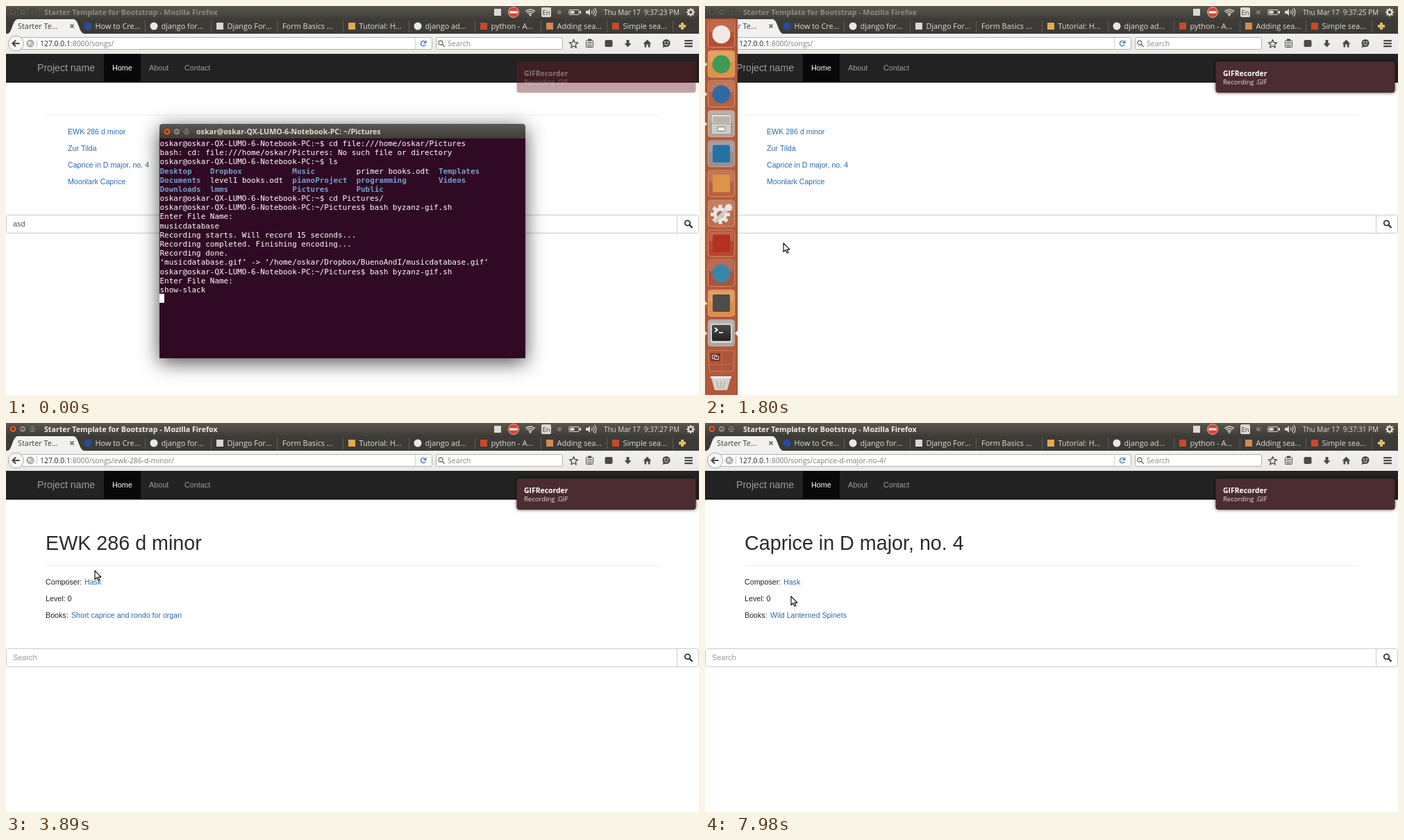
These frames come from a looping animation (998x561 px, 8000 ms). An HTML page with a canvas:

```html
<!DOCTYPE html>
<html lang="en">
<head>
<meta charset="utf-8">
<title>Song browser</title>
<style>
html, body { margin: 0; width: 100%; height: 100%; overflow: hidden; background: #fff; }
canvas { display: block; }
</style>
</head>
<body>
<canvas id="stage" width="998" height="561"></canvas>
<script>
const ctx = document.getElementById('stage').getContext('2d');
const LOOP = 8000;
const UI = '"Open Sans", "Noto Sans", sans-serif';
const WEB = '"Liberation Sans", Arial, sans-serif';
const MONO = '"DejaVu Sans Mono", monospace';
const LINK = '#2a69b0';

// Drawing helpers
function text(str, x, y, size, color, family = UI, weight = 400) {
  ctx.font = `${weight} ${size}px ${family}`;
  ctx.fillStyle = color;
  ctx.fillText(str, x, y);
}
function box(x, y, w, h, fill, r = 0, stroke) {
  ctx.beginPath();
  ctx.roundRect(x, y, w, h, r);
  if (fill) { ctx.fillStyle = fill; ctx.fill(); }
  if (stroke) { ctx.strokeStyle = stroke; ctx.lineWidth = 1; ctx.stroke(); }
}
function dot(x, y, r, fill, stroke, width = 1) {
  ctx.beginPath();
  ctx.arc(x, y, r, 0, Math.PI * 2);
  if (fill) { ctx.fillStyle = fill; ctx.fill(); }
  if (stroke) { ctx.strokeStyle = stroke; ctx.lineWidth = width; ctx.stroke(); }
}
function arc(x, y, r, from, to, color, width = 1.3) {
  ctx.beginPath();
  ctx.arc(x, y, r, from, to);
  ctx.strokeStyle = color;
  ctx.lineWidth = width;
  ctx.stroke();
}
function shape(d, x, y, fill, stroke, width = 1) {
  const p = new Path2D(d);
  ctx.save();
  ctx.translate(x, y);
  if (fill) { ctx.fillStyle = fill; ctx.fill(p); }
  if (stroke) { ctx.strokeStyle = stroke; ctx.lineWidth = width; ctx.stroke(p); }
  ctx.restore();
}
function fade(y0, y1, a, b) {
  const g = ctx.createLinearGradient(0, y0, 0, y1);
  g.addColorStop(0, a);
  g.addColorStop(1, b);
  return g;
}
function ramp(t, from, to) {
  const k = Math.min(1, Math.max(0, (t - from) / (to - from)));
  return k * k * (3 - 2 * k);
}
function lens(x, y, r, color, width) {
  dot(x, y, r, null, color, width);
  shape(`M${r * .7} ${r * .7}L${r * 1.9} ${r * 1.9}`, x, y, null, color, width * 1.25);
}
function gear(x, y, r, color, hole) {
  for (let i = 0; i < 8; i++) {
    const a = i * Math.PI / 4;
    shape(`M0 0L${Math.cos(a) * r} ${Math.sin(a) * r}`, x, y, null, color, r * .38);
  }
  dot(x, y, r * .72, color);
  dot(x, y, r * .36, hole);
}

// Pages of the site
const HOST = '127.0.0.1:8000';
const SONG_A = { name: 'EWK 286 d minor', url: '/songs/ewk-286-d-minor/' };
const SONG_B = { name: 'Caprice in D major, no. 4', url: '/songs/caprice-d-major-no-4/' };
const COMPOSER = { name: 'Hask', url: '/composers/hask/' };

const songPage = (song, book) => ({
  url: song.url, title: song.name, rule: 205, search: 325, value: 'Search',
  labels: [['Composer:', 57, 233], ['Level: 0', 57, 257], ['Books:', 57, 281]],
  links: [[COMPOSER.name, 113, 233], [book, 94, 281]]
});
const pages = [
  { from: 0, url: '/songs/', rule: 157, search: 301, value: 'asd', labels: [],
    links: [SONG_A.name, 'Zur Tilda', SONG_B.name, 'Moonlark Caprice'].map((s, i) => [s, 89, 185 + i * 24]) },
  { from: 3220, ...songPage(SONG_A, 'Short caprice and rondo for organ') },
  { from: 5330, url: COMPOSER.url, title: COMPOSER.name, search: 260, value: 'Search', bullets: true, labels: [],
    links: [[SONG_B.name, 57, 208], [SONG_A.name, 57, 224]] },
  { from: 7400, ...songPage(SONG_B, 'Wild Lanterned Spinets') }
];
const statusShows = [[2600, 3220, SONG_A.url], [4220, 5330, COMPOSER.url], [6640, 7400, SONG_B.url]];

// Pointer: time, x, y
const track = [
  [710, 0, 562], [1190, 0, 442], [1400, 14, 466], [1540, 14, 466], [1800, 113, 342],
  [2320, 123, 153], [2370, 123, 153], [2650, 127, 181], [3220, 127, 181], [3890, 128, 213],
  [3970, 126, 228], [6390, 126, 228], [6700, 130, 204], [7190, 130, 204], [7200, 130, 205],
  [7450, 130, 205], [7970, 124, 250]
];
function pointer(t) {
  if (t < track[0][0]) return null;
  for (let i = 1; i < track.length; i++) {
    const [t0, x0, y0] = track[i - 1], [t1, x1, y1] = track[i];
    if (t < t1) {
      const k = ramp(t, t0, t1);
      return { x: x0 + (x1 - x0) * k, y: y0 + (y1 - y0) * k };
    }
  }
  const [, x, y] = track.at(-1);
  return { x, y };
}

// Desktop panel
const ticks = [710, 1470, 2470, 3470, 4470, 5470, 6470, 7470];

function windowButtons(x, y, focused) {
  for (let i = 0; i < 3; i++) {
    const hot = focused && !i;
    const cx = x + i * 14;
    dot(cx, y, 5.2, hot ? '#e2592d' : focused ? '#83807a' : '#57554e', focused ? '#33322e' : '#3b3a35');
    const mark = ['M-2 -2L2 2M2 -2L-2 2', 'M-2.5 0H2.5', 'M-2.5 -2H2.5V2H-2.5Z'][i];
    shape(mark, cx, y, null, '#35342f', 1.1);
  }
}
function panel(t) {
  const focused = t > 1850;
  const ink = '#dfdbd2';
  box(0, 0, 998, 18, fade(0, 18, '#59574f', '#3f3e39'));
  windowButtons(10, 8.5, focused);
  text('Starter Template for Bootstrap - Mozilla Firefox', 55, 12.5, 10.65, focused ? '#f2efe8' : '#8d8a81', UI, 700);
  box(703, 4, 10, 10, '#dcdad5');
  dot(731, 9, 7.5, '#d9432f', '#e9b3a8');
  box(725.5, 7.5, 11, 3, '#fff');
  for (const r of [3, 6, 9]) arc(755, 14, r, -2.4, -.74, ink, 1.6);
  dot(755, 13.5, 1.3, ink);
  box(771, 2, 14, 14, ink, 2);
  text('En', 772.5, 12.5, 9.5, '#3c3b37');
  dot(797, 9, 3, '#77746c');
  box(811, 5.5, 14, 7, null, 1, ink);
  box(812.5, 7, 6, 4, ink);
  box(826, 7, 2, 4, ink);
  shape('M0 -2H3L6 -5V5L3 2H0Z', 835, 9, ink);
  for (const r of [3, 6, 9]) arc(841, 9, r, -.75, .75, ink, 1.1);
  const sec = 23 + ticks.filter(k => t >= k).length;
  text(`Thu Mar 17  9:37:${sec} PM`, 861, 12.5, 9.93, ink);
  gear(986, 9, 6, ink, '#4b4942');
}

// Browser frame
const tabs = [
  ['How to Cre...', '#2a4b9b', 1], ['django for...', '#e8e8e8', 1], ['Django For...', '#d8d8d8', 0],
  ['Form Basics ...', null], ['Tutorial: H...', '#e3a950', 0], ['django ad...', '#e8e8e8', 1],
  ['python - A...', '#c8492d', 0], ['Adding sea...', '#d08a52', 0], ['Simple sea...', '#c8492d', 0]
];
function browser(url) {
  const ink = '#4a4a48';
  box(0, 18, 998, 22, '#3c3b37');
  tabs.forEach(([label, color, round], i) => {
    const x = 118 + i * 95;
    if (color && round) dot(x, 29, 5.5, color);
    else if (color) box(x - 5, 24, 10, 10, color);
    text(label, color ? x + 10.5 : x - 5, 33, 10.9, '#e2dfd7');
    box(x + 82, 21, 1, 17, '#5f5d56');
  });
  shape('M-2 -5H2V-2H5V2H2V5H-2V2H-5V-2H-2Z', 974, 29, '#d9bf62');
  shape('M0 40C7 40 7 19 15 19H95C103 19 103 40 111 40Z', 2, 0, '#f2f1f0');
  text('Starter Te...', 17, 33, 10.9, '#3c3c3c');
  shape('M-2.5 -2.5L2.5 2.5M2.5 -2.5L-2.5 2.5', 95, 29, null, '#5c5b57', 1.6);

  box(0, 40, 998, 29, fade(40, 69, '#f2f1f0', '#eae8e5'));
  box(20, 45.5, 593.5, 17, '#fff', 2, '#b4b1ab');
  box(619.5, 45.5, 182, 17, '#fff', 2, '#b4b1ab');
  dot(14.5, 54, 11, '#f8f7f6', '#aaa7a1');
  shape('M5 0H-5M-.5 -4.5L-5 0L-.5 4.5', 14.5, 54, null, ink, 2.2);
  dot(35, 54, 5, '#b9b9b9', '#8d8d8d');
  shape('M-3 -2L0 -3L1 0L-2 2ZM2 1L4 0L2 4Z', 35, 54, '#eee');
  box(44, 48, 1, 12, '#c4c2be');
  text(HOST.slice(0, 9), 49, 58, 10.4, '#222');
  const w = ctx.measureText(HOST.slice(0, 9)).width;
  text(HOST.slice(9) + url, 49 + w, 58, 10.4, '#7d7d7d');
  box(589, 46, 1, 16, '#d4d2ce');
  arc(601, 54, 3.6, .5, 5.3, '#5b7fb5', 1.5);
  shape('M0 -5V0H-5Z', 605.5, 54, '#5b7fb5');
  lens(626, 53, 3, '#777', 1.3);
  text('Search', 636, 58, 10.6, '#8a8a8a');

  shape('M0 -6L1.7 -2L6 -1.6L2.7 1.2L3.7 5.5L0 3.2L-3.7 5.5L-2.7 1.2L-6 -1.6L-1.7 -2Z', 817.5, 54.5, null, ink, 1.3);
  box(835.5, 49.5, 10, 10, null, 1, ink);
  box(838, 47.5, 5, 3, ink);
  for (const y of [52, 54.5, 57]) box(837, y, 7, 1, ink);
  box(862.5, 49, 11, 10, ink, 2);
  shape('M-2 -5H2V0H5L0 5.5L-5 0H-2Z', 895.5, 54, ink);
  shape('M0 -5.5L6 .5H4V5.5H1.3V1.5H-1.3V5.5H-4V.5H-6Z', 923.5, 54, ink);
  dot(951, 53.5, 5.5, ink);
  shape('M-4 2L-5.5 6.5L0 5Z', 951, 53.5, ink);
  for (const x of [949, 953]) dot(x, 52, .9, '#fff');
  arc(951, 53.5, 2.6, .3, 2.84, '#fff', 1);
  for (const y of [49, 53, 57]) box(977, y, 12, 2.2, ink, 1);
}

// Site content
function site(page, mouse, t) {
  box(0, 69, 998, 492, '#fff');
  box(0, 69, 998, 41, '#222');
  box(0, 109, 998, 1.5, '#080808');
  box(141, 69, 53, 41, '#080808');
  text('Project name', 45, 94, 14.1, '#9d9d9d', WEB);
  text('Home', 153, 93, 10.8, '#fff', WEB);
  text('About', 206, 93, 10.8, '#9d9d9d', WEB);
  text('Contact', 257, 93, 10.8, '#9d9d9d', WEB);

  if (page.title) text(page.title, 57, 183, 28.7, '#2b2b2b', WEB);
  if (page.rule) box(57, page.rule, 884, 1, '#eee');
  for (const [s, x, y] of page.labels) text(s, x, y, 10.7, '#222', WEB);

  let over = false;
  for (const [s, x, y] of page.links) {
    ctx.font = `10.65px ${WEB}`;
    const w = ctx.measureText(s).width;
    const hit = mouse && mouse.x >= x && mouse.x <= x + w && mouse.y >= y - 8 && mouse.y <= y + 3;
    text(s, x, y, 10.65, hit ? '#23527c' : LINK, WEB);
    if (hit) { box(x, y + 1, w, 1, '#23527c'); over = true; }
    if (page.bullets) dot(48.5, y - 3.5, 2.2, '#333');
    if (s === COMPOSER.name && t >= 5130 && t < 5330) {
      ctx.setLineDash([1, 1]);
      box(x + .5, y - 9.5, w - 1, 12, null, 0, '#555');
      ctx.setLineDash([]);
    }
  }

  const y = page.search;
  box(.5, y + .5, 997, 26, '#fff', 3, '#ccc');
  box(966, y + 1, 1, 25, '#ccc');
  text(page.value, 10, y + 17, 10.9, page.value === 'asd' ? '#555' : '#999', WEB);
  lens(981.5, y + 12, 3.7, '#333', 1.8);
  return over;
}
function status(t) {
  for (const [from, to, url] of statusShows) {
    if (t < from || t >= to) continue;
    ctx.globalAlpha = Math.min(1, .4 + (t - from) / 180);
    const s = HOST + url.replace(/\/$/, '');
    ctx.font = `10.2px ${UI}`;
    const w = ctx.measureText(s).width + 10;
    box(-.5, 545.5, w, 17, '#f2f1f0', [0, 3, 0, 0], '#b6b4af');
    text(s, 3, 557, 10.2, '#3c3c3c');
    ctx.globalAlpha = 1;
  }
}

// Terminal window; a * marks a folder
const CELL = 6.58, ROW = 13.18;
const home = 'oskar@oskar-QX-LUMO-6-Notebook-PC:~';
const listing = [
  ['*Desktop', '*Dropbox', '*Music', 'primer books.odt', '*Templates'],
  ['*Documents', 'level1 books.odt', '*pianoProject', '*programming', '*Videos'],
  ['*Downloads', '*lmms', '*Pictures', '*Public']
];
const output = [
  home + '$ cd file:///home/oskar/Pictures',
  'bash: cd: file:///home/oskar/Pictures: No such file or directory',
  home + '$ ls',
  ...listing,
  home + '$ cd Pictures/',
  home + '/Pictures$ bash byzanz-gif.sh',
  'Enter File Name:',
  'musicdatabase',
  'Recording starts. Will record 15 seconds...',
  'Recording completed. Finishing encoding...',
  'Recording done.',
  '‘musicdatabase.gif’ -> ‘/home/oskar/Dropbox/BuenoAndI/musicdatabase.gif’',
  home + '/Pictures$ bash byzanz-gif.sh',
  'Enter File Name:',
  'show-slack',
  'Recording starts. Will record 15 seconds...'
];
const columns = [0, 11, 29, 43, 61];

function terminal(t) {
  const k = ramp(t, 1520, 1720);
  if (k >= 1) return;
  ctx.save();
  ctx.globalAlpha = 1 - k;
  ctx.translate(24 * k, 472 * k);
  ctx.scale(1 - k * .9, 1 - k * .9);
  ctx.shadowColor = 'rgba(0,0,0,.7)';
  ctx.shadowBlur = 28;
  ctx.shadowOffsetY = 6;
  box(221, 170, 527, 338, '#300a24', [5, 5, 0, 0]);
  ctx.shadowColor = 'transparent';
  box(221, 170, 527, 21, fade(170, 191, '#5b5951', '#3d3c37'), [5, 5, 0, 0]);
  windowButtons(232, 181, true);
  text('oskar@oskar-QX-LUMO-6-Notebook-PC: ~/Pictures', 274, 185, 10.65, '#dfdbd2', UI, 700);
  const rows = t < 100 ? 17 : 18;
  output.slice(0, rows).forEach((row, i) => {
    const y = 202 + i * ROW;
    if (typeof row === 'string') return text(row, 221.5, y, 10.93, '#fff', MONO);
    row.forEach((name, c) => {
      const dir = name[0] === '*';
      text(dir ? name.slice(1) : name, 221.5 + columns[c] * CELL, y, 10.93, dir ? '#729fcf' : '#fff', MONO, dir ? 700 : 400);
    });
  });
  if (t < 400 || t >= 1000) box(221, Math.round(191 + rows * ROW), 7, 13, '#fff');
  ctx.restore();
}

// Launcher: tile colour, then a plain mark or a drawing
const apps = [
  ['#b4502f', '#f3e9e4', 1], ['#dc9346', '#3f9a55', 1], ['#b9613f', '#2f6aa8', 1], ['#b9a396', cabinet],
  ['#9a8f90', '#2272a8', 0], ['#b9613d', '#dd9448', 0], ['#bb6a4a', wrench], ['#b4492f', '#b5301f', 0],
  ['#ab5439', '#3a86a8', 1], ['#dd8f47', '#4c4c4c', 0], ['#a9a7a3', prompt]
];
function cabinet(y) {
  box(9, y - 14, 29, 29, '#e3e1dd', 3, '#8d8a85');
  box(11, y - 11, 25, 9, '#b8b5ae', 1);
  box(9, y - 1, 29, 16, '#cfccc6', 2, '#8d8a85');
  box(18, y + 4, 11, 6, '#f4f3f1', 1, '#77746e');
}
function wrench(y) {
  gear(22, y + 1, 14, '#e8e6e2', '#bb6a4a');
  shape('M-10 12L9 -8', 24, y, null, '#cfcdc8', 5);
  dot(34, y - 9, 5, '#e8e6e2');
}
function prompt(y) {
  box(8, y - 14, 31, 28, '#d4d2ce', 3);
  box(10, y - 12, 27, 23, fade(y - 12, y + 11, '#4a4a4a', '#222'), 2);
  shape('M0 0L4 3L0 6M6 7H12', 14, y - 8, null, '#fff', 1.6);
}
function launcher(t) {
  const k = ramp(t, 760, 980) * (1 - ramp(t, 2000, 2260));
  if (!k) return;
  ctx.save();
  ctx.translate(-48 * (1 - k), 0);
  box(0, 18, 47, 543, '#b3583a');
  box(46, 18, 1, 543, '#9a452b');
  apps.forEach(([tile, mark, round], i) => {
    const y = 41 + i * 43.1;
    box(4.5, y - 19.5, 38, 38, tile, 4, 'rgba(255,235,220,.4)');
    box(6, y - 18, 35, 15, 'rgba(255,255,255,.14)', 3);
    if (typeof mark === 'function') mark(y);
    else if (round) dot(23.5, y, 13, mark);
    else box(11, y - 13, 25, 25, mark, 2);
    if ([1, 2, 3, 9, 10].includes(i)) shape('M0 -3L3.5 0L0 3Z', 0, y, '#f0e4dd');
  });
  shape('M0 -4L-4 0L0 4Z', 47, 472, '#f4ece8');
  shape('M0 0H38L36 30H2Z', 4.5, 497, '#ad5639', '#c98268');
  box(8, 501, 14, 11, '#6d3b2d', 1);
  box(10.5, 503.5, 6, 5, null, 0, '#e6ddd8');
  box(13.5, 505.5, 6, 4, '#6d3b2d', 0, '#e6ddd8');
  shape('M20 2V30M4 18H36', 4, 499, null, '#c07258');
  // the folded bin rises when the pointer leaves
  const bin = 541 - 5 * ramp(t, 1540, 1700);
  shape('M0 0H28L23 18H5Z', 9, bin, '#d5d2cd');
  box(8, bin - 2, 30, 3, '#eeece8', 1);
  shape('M8 5L11 16M14 5V16M20 5L17 16', 9, bin, null, '#a5a29c');
  ctx.restore();
}

function notice(t) {
  const solid = t >= 160;
  ctx.save();
  ctx.globalAlpha = t < 50 ? .38 : t < 100 ? .62 : solid ? 1 : .85;
  ctx.shadowColor = solid ? 'rgba(0,0,0,.7)' : 'rgba(0,0,0,.15)';
  ctx.shadowBlur = 5;
  box(735.5, 80, 258, 45, t < 50 ? '#721f26' : '#4b2c30', 4);
  ctx.shadowColor = 'transparent';
  text('GIFRecorder', 746, 101, 10.4, '#fff', UI, 700);
  text('Recording .GIF', 746, 112.5, 9.5, '#e6dfdf');
  ctx.restore();
}
function drawPointer({ x, y }, hand) {
  ctx.lineJoin = 'round';
  if (hand) shape('M-1 0Q0 -1 1 0V4L6 5Q7 6 7 8L5.5 13H-1L-4 8Q-4 6 -1 8Z', x, y, '#fff', '#111');
  else shape('M0 0V12.5L3 9.8L5 14.2L7 13.3L5 9.1H9Z', x, y, '#fff', '#111', 1.2);
}

function draw(now) {
  const t = now % LOOP;
  const page = pages.findLast(p => t >= p.from);
  const mouse = pointer(t);
  const over = site(page, mouse, t);
  browser(page.url);
  status(t);
  terminal(t);
  launcher(t);
  panel(t);
  notice(t);
  if (mouse) drawPointer(mouse, over);
}
let start;
function loop(now) {
  start ??= now;
  draw(now - start);
  requestAnimationFrame(loop);
}
draw(0);
requestAnimationFrame(loop);
</script>
</body>
</html>
```
